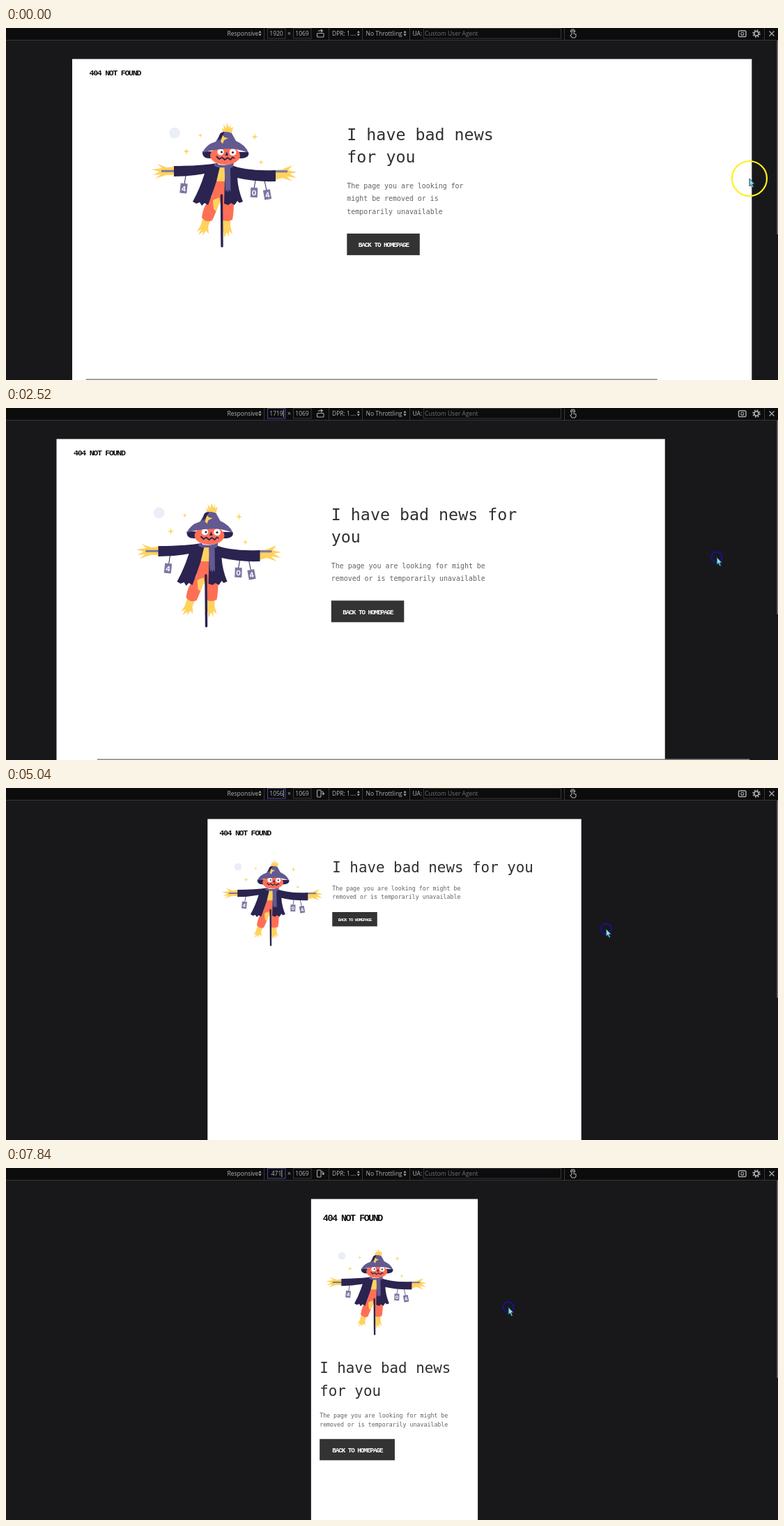
An HTML page for the animation above (8000 ms loop, 1108 px wide and 505 px high).

```html
<!DOCTYPE html>
<html lang="en">
<head>
<meta charset="utf-8">
<title>Responsive 404 page</title>
<style>
  html, body { margin: 0; width: 100%; height: 100%; overflow: hidden; background: #18181a; }
  svg { display: block; width: 1108px; height: 505px; }
  .ui { font: 8.5px "Open Sans", "Noto Sans", sans-serif; fill: #b4b4b6; }
  .mono { font-family: "DejaVu Sans Mono", monospace; white-space: pre; }
  .tight { font-family: "Liberation Mono", monospace; font-weight: 700; letter-spacing: -.112em; white-space: pre; }
  .line { fill: none; stroke: #a9a9ab; stroke-width: 1.1; }
  .box { fill: #0c0c0d; stroke: #38383d; }
  .straw { fill: #ffd25f; }
  .dark { fill: #2b2350; }
  .plum { fill: #625a91; }
  .skin { fill: #ff6f56; }
  .tag { fill: #7b77a3; }
  .thread { stroke: #2b2350; stroke-width: 1; }
  .digit { font: 700 10px Inter, sans-serif; fill: #fff; text-anchor: middle; }
</style>
</head>
<body>
<svg viewBox="0 0 1108 505">
  <rect width="1108" height="505" fill="#18181a"/>
  <rect id="sheet" y="44.5" height="461" fill="#fff"/>

  <g id="art">
    <circle cx="242" cy="150.5" r="7.8" fill="#e9eef7"/>
    <g id="stars" class="straw"></g>
    <!-- hands -->
    <path class="straw" d="M242 199L231 200L217 195L224 201L209 203L220 206L211 211L222 210L214 216L230 211L242 211Z"/>
    <path class="straw" d="M386 204L396 203L411 197L405 204L418 207L407 209L417 215L403 213L411 220L397 215L386 218Z"/>
    <path d="M223 205.3H242M386 205.7H404" stroke="#7b77a3" stroke-width="3"/>
    <!-- legs -->
    <path class="straw" d="M283 272L279 284L274 292L280 289L276 297L283 292L282 298L287 291L291 295L290 285L294 275Z"/>
    <path class="straw" d="M311 273L311 285L307 297L312 292L313 301L317 293L320 300L320 291L325 296L322 284L322 273Z"/>
    <path class="skin" d="M302 217H317L327 248Q327 264 325 275Q317 279 309 275L310 248L305 252Q301 266 296 276Q287 280 281 272Q283 254 295 242Z"/>
    <path class="straw" d="M297 247L306 243L308 251L303 256L302 263L298 260Z"/>
    <path class="straw" d="M304 198H316L315 220H302Z"/>
    <!-- coat -->
    <path class="dark" d="M241 198Q278 198 303 194L307 199L302 220Q297 236 290 254L285 251L281 255L278 250L273 252L268 249Q278 231 285 209Q264 213 241 213Z"/>
    <path class="dark" d="M321 196Q346 206 387 204V220Q357 221 332 215Q333 232 340 249L335 251L332 248L328 254L323 251L319 254L313 252L314 216L315 198Z"/>
    <path d="M309.4 240L310 313" stroke="#2b2350" stroke-width="3.4" stroke-linecap="round"/>
    <path class="plum" d="M299 194Q313 200 327 193L326 199Q323 201 322 201L322.5 235L320 232L318.5 236L317 232L315 235L313.5 200Q304 201 299 198Z"/>
    <!-- head -->
    <path class="dark" d="M282 177Q281 187 292 187L338 187Q350 186 348 178Z"/>
    <ellipse class="skin" cx="314.5" cy="183" rx="21.5" ry="13"/>
    <circle cx="308" cy="177.8" r="4.7" fill="#fff"/>
    <circle cx="325.5" cy="178.2" r="4.9" fill="#fff"/>
    <g class="dark">
      <circle cx="309.5" cy="178" r="1.5"/><circle cx="325.5" cy="178.5" r="1.6"/>
      <path d="M317 177L314.5 183H319Z"/>
    </g>
    <path d="M302 184L306 188L310 185.5L314 189L318 186L322 189L325 185.5L328 187" fill="none" stroke="#2b2350" stroke-width="1.8"/>
    <path class="straw" d="M311 151L310 143L313 146L312 138L316 144L317 136L320 143L323 138L322 144L326 142L324 151Z"/>
    <path class="plum" d="M282 179Q287 167 301 163L308 151Q316 147 324 151L330 162Q344 168 348 179Q331 172 315 173.500Q297 174 282 179Z"/>
    <path class="dark" d="M307 152Q309 149 314 149L309 158L304 162Z"/>
    <path class="straw" d="M311 154L314 157L319 158L313 161L311 166L308 163Z"/>
    <!-- tags -->
    <path class="thread" d="M258 212L256 224M358 219L356 230M371 219L374 233"/>
    <g id="tags"></g>
  </g>

  <g id="copy"></g>
  <rect id="hbar" y="503.500" height="1.500" fill="#858587"/>
  <rect id="vbar" x="1106.500" y="18" width="1.500" fill="#77777a"/>

  <!-- toolbar -->
  <rect width="1108" height="17" fill="#0c0c0d"/>
  <path d="M0 17.500H1108M370.500 0V17M463.500 0V17M511.500 0V17M579.500 0V17M801.500 0V17M1088.500 0V17" stroke="#36363a"/>
  <rect id="field" class="box" x="375.500" y=".5" width="25.500" height="14.500"/>
  <rect class="box" x="412.500" y=".5" width="25.500" height="14.500"/>
  <rect class="box" x="599.500" y=".5" width="197" height="14.500"/>
  <rect id="mark" x="378" y="2" width="20" height="12" fill="#3a5ba8"/>
  <g class="ui">
    <text x="317.500" y="11">Responsive</text>
    <text id="size" x="388" y="11" text-anchor="middle"></text>
    <text x="404" y="11">×</text>
    <text x="425" y="11" text-anchor="middle">1069</text>
    <text x="468" y="11">DPR: 1.…</text>
    <text x="516.500" y="11">No Throttling</text>
    <text x="583.500" y="11">UA:</text>
    <text x="601" y="11" style="fill:#737376">Custom User Agent</text>
  </g>
  <path id="carets" fill="#b4b4b6"/>
  <path id="caret" stroke="#ddd" stroke-width=".8"/>
  <g class="line">
    <g id="land"><rect x="446.500" y="7.500" width="9.500" height="5.500" rx="1"/><path d="M448 5Q449 3 454 4M452 2L454.500 4L452 6"/></g>
    <g id="port"><rect x="446.500" y="3" width="5.500" height="10" rx="1"/><path d="M453 5Q456 5 455.500 9M453.500 7.500L455.500 9.500L457 7.500"/></g>
    <path d="M812 9V4.500Q813.500 3 815 4.500V8L818 9V12L816.500 14H812.500L810 10.500L812 9M810.500 6Q810 2 813.500 2Q817 2 816.500 6"/>
    <rect x="1051.500" y="4" width="10.500" height="8.500" rx="1.500" stroke-width="1.500"/><circle cx="1056.800" cy="8.300" r="2"/>
    <circle cx="1077" cy="8" r="3.200" stroke-width="1.700"/><circle cx="1077" cy="8" r="4.900" stroke-width="1.700" stroke-dasharray="1.900 1.950"/>
    <path d="M1095.500 4.500L1102.500 11.500M1102.500 4.500L1095.500 11.500" stroke-width="1.400"/>
  </g>

  <g id="pointer">
    <circle id="ring" fill="none" stroke-width="2.200"/>
    <path id="arrow" d="M0 0V11L2.400 8.800L4.400 13L6.200 12.200L4.300 8H7.500Z" fill="#86e0dc" stroke="#16344a" stroke-width=".9"/>
    <path id="resize" d="M-8.500 0L-4.500 -3.500V-1.200H4.500V-3.500L8.500 0L4.500 3.500V1.200H-4.500V3.500Z" fill="#7fc4cc" stroke="#14264a" stroke-width="1"/>
  </g>
</svg>
<script>
const LOOP = 8000, STEP = 140, ZOOM = .508, MID = 557.5, STAGE = 1108;
const HEAD = "I have bad news for you";
const BODY = "The page you are looking for might be removed or is temporarily unavailable";
const $ = id => document.getElementById(id);
const set = (id, attrs) => { for (const k in attrs) $(id).setAttribute(k, attrs[k]); };
const show = (id, on) => { $(id).style.display = on ? "" : "none"; };

// [time, value]
const widths = [[0, 1920], [1260, 1920], [1400, 1884], [1540, 1884], [2520, 1719], [3780, 1396],
  [4060, 1305], [4900, 1096], [5040, 1056], [6580, 663], [7840, 471]];
const heights = [[0, 216], [420, 223], [700, 223], [840, 224], [1260, 224], [2520, 214],
  [4060, 205], [5040, 202], [6580, 201], [7840, 199.5]];

function at(track, t) {
  const i = track.findIndex(k => k[0] >= t);
  if (i < 0) return track[track.length - 1][1];
  if (i === 0) return track[0][1];
  const [t0, a] = track[i - 1], [t1, b] = track[i];
  return a + (b - a) * (t - t0) / (t1 - t0);
}

// Breakpoints; x values count from the sheet's left edge.
const desktop = {
  title: { x: 24.5, y: 68, size: 11.6 }, art: { x: 113.5, y: 136, scale: 1 },
  x: 394.3, head: { y: 160.5, size: 23.3 }, body: { gap: 36.5, size: 9.93, lead: 18.6 },
  button: { gap: 28.2, w: 104.5, h: 31, pad: 16.5, size: 9.28, dy: 19.2 }
};
const laptop = {
  ...desktop, art: { x: 82.2, y: 136, scale: 1 }, x: 362,
  body: { gap: 34, size: 9.93, lead: 14.9 },
  button: { gap: 25.5, w: 88.5, h: 31, pad: 16.3, size: 7.2, dy: 19 }
};
const tablet = {
  title: { x: 17, y: 68, size: 11.6 }, art: { x: 20.5, y: 103, scale: .692 },
  x: 179, head: { y: 121, size: 20.85 }, body: { gap: 26, size: 8.27, lead: 12.4 },
  button: { gap: 18.6, w: 64.5, h: 20.5, pad: 8.5, size: 6.15, dy: 13.3 }
};
const phone = {
  ...tablet, title: { x: 17, y: 75.5, size: 13.4 }, art: { x: 21, y: 116, scale: .692 },
  x: 12.3, head: { y: 294, size: 20.85 }, body: { gap: 31.7, size: 8.27, lead: 12.4 },
  button: { gap: 18.2, w: 107.8, h: 30.5, pad: 18, size: 9.28, dy: 19 }
};

// Layout, then the line lengths of heading and paragraph in characters.
function layout(width) {
  if (width >= 1800) return [desktop, 16, 30];
  if (width >= 1440) return [desktop, 20, 40];
  if (width >= 1200) return [laptop, 13, 26];
  if (width > 768) return [tablet, 23, 40];
  const room = width * ZOOM - 25;
  return [phone, Math.floor(room / 12.55), Math.floor(room / 4.98)];
}

function wrap(text, max) {
  const lines = [""];
  for (const word of text.split(" ")) {
    const last = lines.length - 1, longer = (lines[last] + " " + word).trim();
    if (longer.length <= max) lines[last] = longer; else lines.push(word);
  }
  return lines;
}

const label = (s, x, y, size, fill, cls) =>
  `<text class="${cls}" x="${x}" y="${y}" font-size="${size}" fill="${fill}">${s}</text>`;

function drawPage(width, left) {
  const [p, headMax, bodyMax] = layout(width);
  const x = left + p.x, b = p.button;
  let out = label("404 NOT FOUND", left + p.title.x, p.title.y, p.title.size, "#0c0c0c", "tight");
  let y = p.head.y;
  wrap(HEAD, headMax).forEach((s, i) => {
    if (i) y += 32.5;
    out += label(s, x, y, p.head.size, "#303030", "mono");
  });
  y += p.body.gap;
  wrap(BODY, bodyMax).forEach((s, i) => {
    if (i) y += p.body.lead;
    out += label(s, x, y, p.body.size, "#626262", "mono");
  });
  y += b.gap;
  out += `<rect x="${x}" y="${y}" width="${b.w}" height="${b.h}" fill="#333"/>`;
  out += label("BACK TO HOMEPAGE", x + b.pad, y + b.dy, b.size, "#fff", "tight");
  $("copy").innerHTML = out;
  set("art", { transform: `translate(${left + p.art.x} ${p.art.y}) scale(${p.art.scale}) translate(-208.5 -136)` });
  set("sheet", { x: left, width: width * ZOOM });
}

function sheetLeft(width) {
  if (width < 1498) return MID - width * ZOOM / 2;
  return Math.max(72.5 + (width - 1719) * .112, 177 - (width - 1498) * .544);
}

function drawBars(width) {
  const content = 1497 - 1.82 * (1920 - width) * ZOOM, over = content - STAGE;
  show("hbar", over > 0);
  set("vbar", { height: over > 0 ? 278 : 283 });
  if (over > 0) set("hbar", { x: Math.min(155, over) * STAGE / content, width: STAGE * STAGE / content });
}

function drawField(width, active) {
  const shown = String(Math.round(width)), dragged = width < 1920;
  $("size").textContent = shown;
  set("field", { style: active ? "stroke:#474796" : "" });
  show("mark", active && !dragged);
  show("caret", dragged);
  set("caret", { d: `M${388.5 + shown.length * 2.45} 2.5V13` });
  show("land", width >= 1069);
  show("port", width < 1069);
}

function drawPointer(t, width, active) {
  const x = t < 420 ? 1067 + 4 * t / 420 : width === 1920 ? 1070 : 721 + (width - 471) * .2397;
  const sizing = width === 1920 && t >= 280;
  set("pointer", { transform: `translate(${x} ${at(heights, t)})` });
  set("ring", { r: active ? 7.4 : 25, stroke: active ? "#17128f" : "#fff01c" });
  show("resize", sizing);
  show("arrow", !sizing);
}

function draw(t) {
  const width = at(widths, t), active = t >= 1120;
  drawPage(width, sheetLeft(width));
  drawBars(width);
  drawField(width, active);
  drawPointer(t, width, active);
}

$("stars").innerHTML = [[279, 154, 3.5], [357, 156, 5], [259, 177, 5], [366, 192.5, 4]].map(([x, y, r]) =>
  `<path transform="translate(${x} ${y}) scale(${r})" d="M0 -1L.2 -.2L1 0L.2 .2L0 1L-.2 .2L-1 0L-.2 -.2Z"/>`).join("");
$("tags").innerHTML = [[255, 230, 6, 4], [356, 236, 2, 0], [375, 239, -10, 4]].map(([x, y, turn, n]) =>
  `<g transform="translate(${x} ${y}) rotate(${turn})"><rect class="tag" x="-5" y="-7" width="10" height="14"/>
   <text class="digit" y="4">${n}</text></g>`).join("");
set("carets", { d: [364.5, 505.8, 572.5].map(x =>
  `M${x - 2} 6.8L${x} 4L${x + 2} 6.8ZM${x - 2} 8.6L${x} 11.400L${x + 2} 8.6Z`).join("") });

let shownStep = -1;
function tick() {
  const step = Math.min(56, Math.floor(performance.now() % LOOP / STEP));
  if (step !== shownStep) draw((shownStep = step) * STEP);
  requestAnimationFrame(tick);
}
tick();
</script>
</body>
</html>
```
